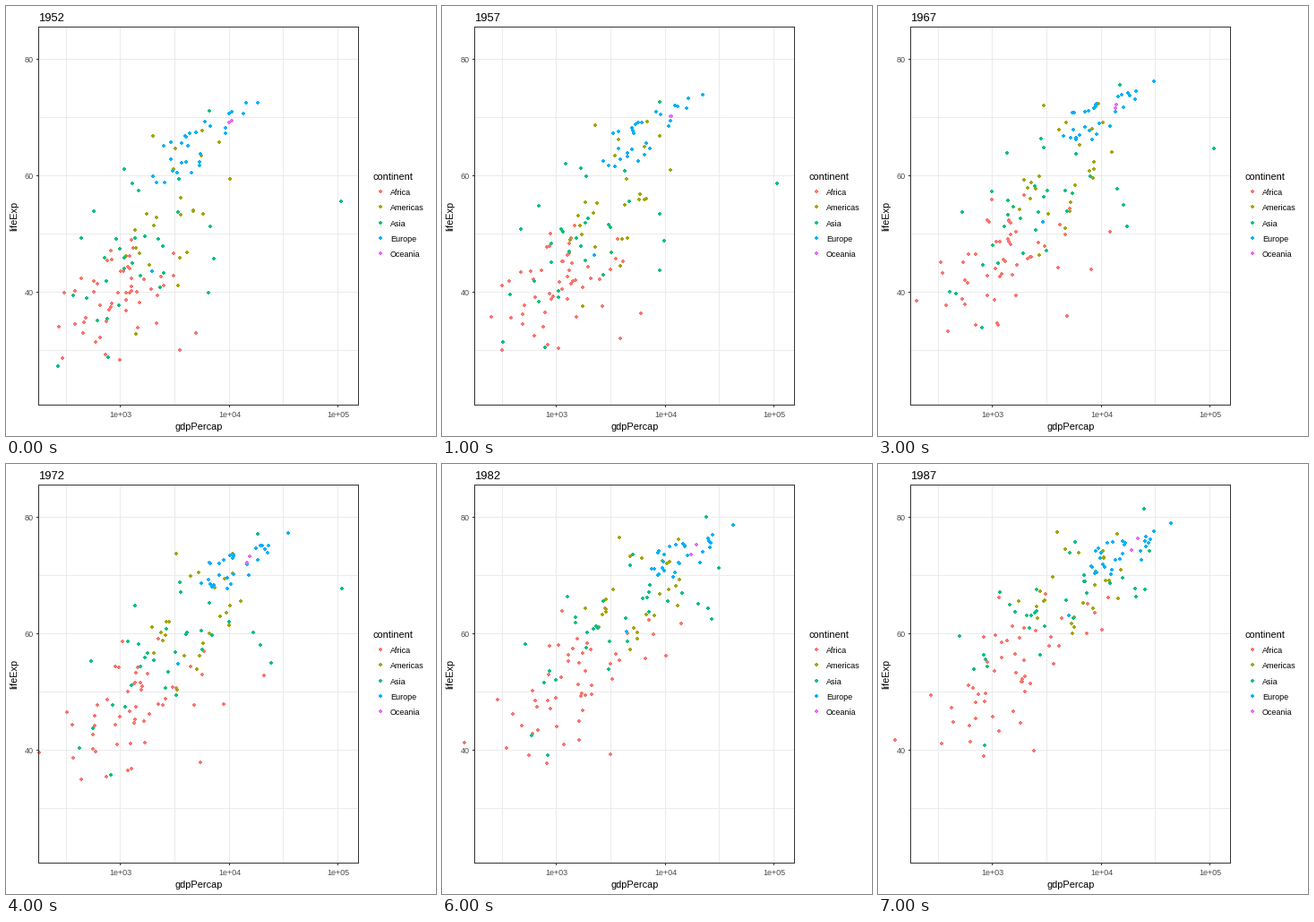
These frames come from a looping animation (480x480 px, 8000 ms). A matplotlib script:

```python
import numpy as np
import matplotlib.pyplot as plt
from matplotlib.animation import FuncAnimation
from matplotlib.collections import PolyCollection
from matplotlib.patches import Rectangle

plt.rcParams["font.family"] = "Liberation Sans"

SIZE = 480
LEFT, TOP = 36.5, 23.5
YEARS = range(1952, 1988, 5)
COLORS = {
    "Africa": "#F8766D",
    "Americas": "#A3A500",
    "Asia": "#00BF7D",
    "Europe": "#00B0F6",
    "Oceania": "#E76BF3",
}

# Per continent: countries, bend of the life curve, then at both ends
# (mean log gdp, its spread, mean life, its spread, correlation).
CLOUDS = {
    "Africa": (50, 1.0, (2.98, 0.27, 39.2, 5.1, 0.35), (3.15, 0.37, 53.3, 7.6, 0.7)),
    "Americas": (25, 1.2, (3.49, 0.26, 53.3, 9.0, 0.6), (3.78, 0.28, 68.1, 5.6, 0.65)),
    "Asia": (29, 1.0, (3.14, 0.35, 47.5, 8.6, 0.5), (3.58, 0.46, 65.5, 6.8, 0.8)),
    "Europe": (29, 1.6, (3.70, 0.25, 65.3, 4.4, 0.85), (4.18, 0.20, 73.9, 2.4, 0.75)),
}

# Countries apart from the clouds: key points of (year, gdp, life).
LONERS = [
    ("Asia", [(1952, 108400, 55.6), (1972, 109300, 67.7), (1982, 31400, 71.3),
              (1987, 28100, 74.2)]),
    ("Asia", [(1952, 6460, 39.9), (1977, 34170, 58.7), (1987, 21200, 66.3)]),
    ("Asia", [(1952, 779, 28.8), (1987, 852, 40.8)]),
    ("Asia", [(1952, 368, 39.4), (1972, 422, 40.3), (1977, 525, 31.2),
              (1987, 684, 53.9)]),
    ("Africa", [(1952, 2388, 42.7), (1972, 21010, 52.8), (1987, 11770, 66.2)]),
    ("Africa", [(1952, 3521, 30.0), (1972, 5473, 37.9), (1987, 2430, 39.9)]),
    ("Europe", [(1952, 1969, 43.6), (1987, 5089, 63.1)]),
    ("Oceania", [(1952, 10040, 69.1), (1987, 21890, 76.3)]),
    ("Oceania", [(1952, 10557, 69.4), (1987, 19007, 74.3)]),
]

rng = np.random.default_rng(7)


def scatter(n):
    z = np.clip(rng.normal(size=(2, n)), -2, 2)
    z -= z.mean(axis=1, keepdims=True)
    return z / z.std(axis=1, keepdims=True)


def drifting(n):
    start = scatter(n)
    return start, 0.85 * start + 0.53 * scatter(n)


ranks = {name: drifting(cloud[0]) for name, cloud in CLOUDS.items()}


def ease_out(u, power):
    return 1 - (1 - u) ** power


def mix(a, b, k):
    return a + (b - a) * k


def cloud_at(name, u):
    _, bend, start, end = CLOUDS[name]
    slow, fast = ease_out(u, bend), ease_out(u, 1.6)
    gdp, gdp_sd, life, life_sd, r = (
        mix(a, b, k) for a, b, k in zip(start, end, (fast, fast, slow, slow, u)))
    z, w = mix(*ranks[name], u)
    return np.column_stack([gdp + gdp_sd * z,
                            life + life_sd * (r * z + np.sqrt(1 - r * r) * w)])


def loner_at(keys, year):
    years, gdp, life = zip(*keys)
    return np.interp(year, years, np.log10(gdp)), np.interp(year, years, life)


def positions(year):
    u = (year - YEARS[0]) / (YEARS[-1] - YEARS[0])
    parts = [cloud_at(name, u) for name in CLOUDS]
    parts.append([loner_at(keys, year) for _, keys in LONERS])
    gdp, life = np.vstack(parts).T
    return np.column_stack([px(gdp), py(life)])


def px(log_gdp):
    return LEFT + (log_gdp - 2.2487) * 121.43


def py(life):
    return TOP + (85.553 - life) * 6.502


# A four pixel dot without its corners.
QUARTER = np.array([(2, -1), (2, 1), (1, 1)])
DOT = np.vstack([QUARTER @ np.array([[c, s], [-s, c]])
                 for c, s in [(1, 0), (0, 1), (-1, 0), (0, -1)]])


def dots(centers):
    return np.floor(centers)[:, None, :] + DOT


def add_dots(centers, colors):
    group = PolyCollection(dots(centers), facecolors=colors, linewidths=0,
                           antialiaseds=False, zorder=3)
    ax.add_collection(group, autolim=False)
    return group


def bar(x, y, w, h, color, z=1):
    ax.add_patch(Rectangle((x, y), w, h, fc=color, lw=0, aa=False, zorder=z))


def label(x, y, text, size, color="black", **kw):
    return ax.text(x, y, text, size=size, color=color, va="baseline", **kw)


fig = plt.figure(figsize=(SIZE / 72, SIZE / 72), dpi=72, facecolor="white")
ax = fig.add_axes([0, 0, 1, 1])
ax.set_xlim(0, SIZE)
ax.set_ylim(SIZE, 0)
ax.axis("off")

GRID, DARK, GREY = "#EBEBEB", "#333333", "#4D4D4D"
for v in np.arange(2.5, 5.1, 0.5):
    x = int(px(v))
    bar(x, 24, 1, 421, GRID)
    if v % 1 == 0:
        bar(x, 446, 1, 2, DARK)
        label(x + 0.5, 459, f"1e+{int(v):02d}", 9, GREY, ha="center")
for v in range(30, 81, 10):
    y = int(py(v))
    bar(37, y, 356, 1, GRID)
    if v % 20 == 0:
        bar(34, y, 2, 1, DARK)
        label(31, y + 4, str(v), 9, GREY, ha="right")
for x in (36, 393):
    bar(x, 23, 1, 423, DARK, 4)
for y in (23, 445):
    bar(36, y, 358, 1, DARK, 4)

label(215, 473, "gdpPercap", 11, ha="center")
ax.text(14, 234, "lifeExp", size=11, rotation=90, ha="right", va="center")
label(410, 194, "continent", 11)
legend_y = 207.6 + 17.28 * np.arange(len(COLORS))
for name, y in zip(COLORS, legend_y):
    label(429, int(y) + 4, name, 9)
add_dots(np.column_stack([np.full(len(COLORS), 418), legend_y]),
         list(COLORS.values()))

title = label(36, 17, "", 13)
owners = [name for name in CLOUDS for _ in range(CLOUDS[name][0])]
owners += [name for name, _ in LONERS]
crowd = add_dots(positions(YEARS[0]), [COLORS[name] for name in owners])


def update(i):
    crowd.set_verts(dots(positions(YEARS[i])))
    title.set_text(str(YEARS[i]))
    return crowd, title


anim = FuncAnimation(fig, update, frames=len(YEARS), interval=1000,
                     init_func=lambda: update(0), repeat=True, repeat_delay=0)
plt.show()
```
